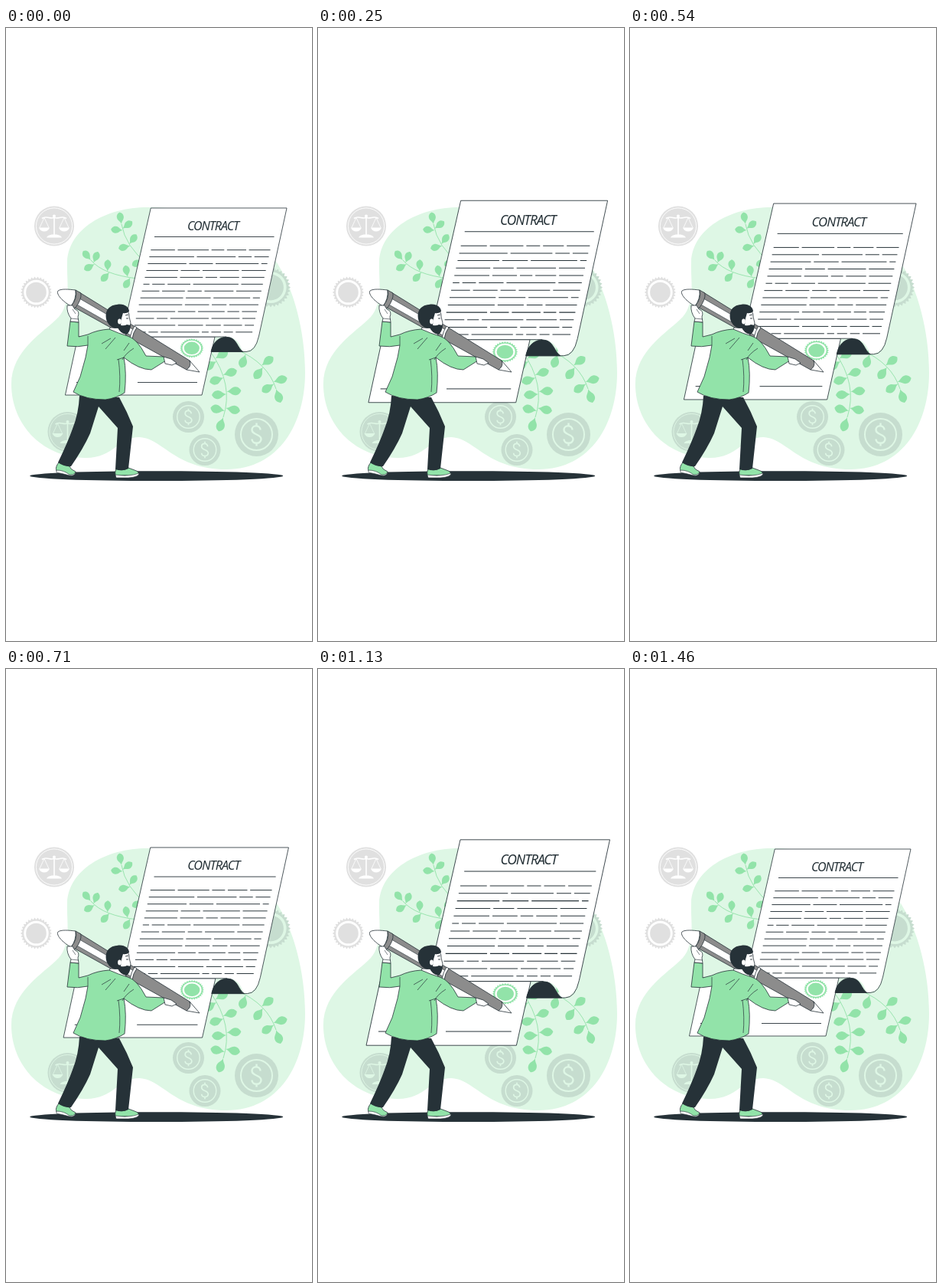
An HTML page with a canvas for the animation above (1.5 s loop, 400 by 800 pixels).

```html
<!DOCTYPE html>
<html lang="en">
<head>
<meta charset="utf-8">
<title>Signing a contract</title>
<style>
html, body { margin: 0; width: 100%; height: 100%; overflow: hidden; background: #fff; }
canvas { display: block; width: 400px; height: 800px; }
</style>
</head>
<body>
<canvas id="stage"></canvas>
<script>
const LOOP = 1500;
const INK = '#263238', GREEN = '#92e3a9', MINT = '#def7e5', WHITE = '#fff';
const GREY = '#e0e0e0', SAGE = '#c6ddcf', BARREL = '#8c8c8c';

const canvas = document.getElementById('stage');
const ratio = window.devicePixelRatio || 1;
canvas.width = 400 * ratio;
canvas.height = 800 * ratio;
const ctx = canvas.getContext('2d');

const mix = (a, b, t) => a + (b - a) * t;

function seeded(seed) {
  return () => {
    const v = Math.sin(seed++ * 12.9898) * 43758.5453;
    return v - Math.floor(v);
  };
}

function shape(d, fill, stroke, width = 0.8) {
  const path = new Path2D(d);
  if (fill) { ctx.fillStyle = fill; ctx.fill(path); }
  if (stroke) { ctx.strokeStyle = stroke; ctx.lineWidth = width; ctx.stroke(path); }
}

function disc(x, y, rx, fill, ry = rx) {
  ctx.fillStyle = fill;
  ctx.beginPath();
  ctx.ellipse(x, y, rx, ry, 0, 0, 7);
  ctx.fill();
}

function ring(x, y, r, color, width) {
  ctx.strokeStyle = color;
  ctx.lineWidth = width;
  ctx.beginPath();
  ctx.arc(x, y, r, 0, 7);
  ctx.stroke();
}

// Draws in local coordinates, then restores the previous space.
function at(x, y, draw, angle = 0, sx = 1, sy = sx) {
  ctx.save();
  ctx.translate(x, y);
  ctx.rotate(angle);
  ctx.scale(sx, sy);
  draw();
  ctx.restore();
}

function badge(x, y, r, color, gap, teeth, sy = 1) {
  at(x, y, () => {
    ctx.fillStyle = color;
    ctx.beginPath();
    for (let i = 0; i < teeth * 2; i++) {
      const a = i * Math.PI / teeth, d = i % 2 ? r * 0.88 : r;
      ctx.lineTo(d * Math.cos(a), d * Math.sin(a));
    }
    ctx.fill();
    disc(0, 0, r * 0.79, gap);
    disc(0, 0, r * 0.65, color);
  }, 0, 1, sy);
}

function scales(x, y, color, line) {
  disc(x, y, 26, color);
  ring(x, y, 23.6, line, 0.9);
  at(x, y, () => {
    shape('M0-13V12M-16-10C-10-14-6-9 0-11C6-9 10-14 16-10', null, line, 1.6);
    for (const side of [-1, 1])
      at(side * 13, 0, () => {
        shape('M0-11L-6 2M0-11L6 2', null, line);
        shape('M-7 2H7Q5 7 0 7Q-5 7-7 2Z', line);
      });
    shape('M-10 15Q-9 12-3 11H3Q9 12 10 15Z', line);
    disc(0, -13, 2, line);
  });
}

function coin(x, y, r) {
  disc(x, y, r, SAGE);
  ring(x, y, r * 0.72, MINT, r * 0.07);
  at(x, y, () => shape('M5-6C5-13-6-13-6-6C-6 1 6-1 6 6C6 13-6 13-6 6M0-15V-11M0 11V15', null, MINT, 2.4), 0, r / 28.5);
}

// Pairs of leaves along a quadratic stem from (x0,y0) to (x1,y1), with one at the tip.
function branch(x0, y0, cx, cy, x1, y1, pairs, size, spread) {
  shape(`M${x0} ${y0}Q${cx} ${cy} ${x1} ${y1}`, null, GREEN, 0.9);
  const along = (a, c, b, t) => mix(mix(a, c, t), mix(c, b, t), t);
  const leaf = (t, turn) => {
    const dx = mix(cx - x0, x1 - cx, t), dy = mix(cy - y0, y1 - cy, t);
    at(along(x0, cx, x1, t), along(y0, cy, y1, t),
      () => shape('M0 0C6-1 7-6 13-6C18-6 20-2 21 0C20 2 18 6 13 6C7 6 6 1 0 0Z', GREEN),
      Math.atan2(dy, dx) + turn, size);
  };
  for (let i = 0; i < pairs; i++) {
    const t = 0.15 + 0.75 * i / (pairs - 1);
    leaf(t, spread);
    leaf(t - 0.04, -spread);
  }
  leaf(1, 0);
}

function backdrop() {
  shape('M185 234C130 234 82 262 80 305C79 330 86 357 69 377C50 397 7 420 7 465C7 515 45 560 103 561C140 562 147 534 174 534C205 535 220 576 288 576C358 576 391 515 391 450C391 400 378 340 350 300C320 256 255 234 185 234Z', MINT);
  scales(63, 258.5, GREY, WHITE);
  scales(80.5, 527, SAGE, MINT);
  badge(39.5, 345, 20.5, GREY, WHITE, 30);
  badge(346, 338.5, 26, SAGE, MINT, 32);
  coin(238.5, 507.5, 20.5);
  coin(260, 550.5, 20.5);
  coin(327.5, 530.5, 28.5);
  branch(185, 308, 156, 285, 151, 256, 3, 0.75, 1.2);
  branch(172, 327, 127, 322, 111, 303, 3, 0.75, 1.2);
  branch(267, 422, 298, 465, 284, 508, 4, 0.92, 1.55);
  branch(302, 420, 342, 437, 353, 471, 3, 0.9, 1.4);
}

function textRows() {
  const random = seeded(5);
  for (let i = 0; i < 13; i++) {
    const y = 289.7 + 8.93 * i, end = 345.5 - 1.95 * i;
    let x = 189.3 - 1.95 * i, d = '';
    while (x < end - 6) {
      let stop = x + 8 + 52 * random();
      if (stop > end - 10) stop = end;
      d += `M${x} ${y}H${stop}`;
      x = stop + 3.6;
    }
    shape(d, null, INK, 0.95);
  }
}

function paper() {
  shape('M94 403H273L256 479H77.5Z', WHITE, INK);
  shape('M189.3 235H367L330.5 402Q326 422.5 309 422.5Q304 403 288 403H151Z', WHITE);
  shape('M268 422.5C271 408 280 403.3 288.5 403.3C302 403.5 302 418 310 422.5Z', INK, INK);
  shape('M288 403H151L189.3 235H367L330.5 402Q326 422.5 314 422.5H268', null, INK);

  ctx.fillStyle = INK;
  ctx.font = "italic 500 16px 'Noto Sans', 'Open Sans', sans-serif";
  ctx.letterSpacing = '-1px';
  ctx.textAlign = 'center';
  ctx.fillText('CONTRACT', 270.5, 264);
  shape('M194 272.5H350.5', null, INK, 0.9);
  textRows();
  shape('M92 462.5H150M172 462.5H250', null, INK, 0.9);
  badge(242.8, 417.8, 15.5, GREEN, WHITE, 28, 0.82);
}

function pen() {
  shape('M96 345L240 434Q244 441 236 446L90 365Z', BARREL, INK);
  shape('M96 353L167 394L163 401L91 360Z', WHITE, INK, 0.6);
  shape('M240 434L253 449L236 446Q243 441 240 434Z', WHITE, INK);
  shape('M168 389Q164 395 162 404L165 406Q166 397 171 391Z', WHITE, INK);
  shape('M91 342C82 341 72 340 68 343C65 347 74 357 85 363Q92 354 91 342Z', WHITE, INK);
  shape('M91 342Q94 352 85 363L90 366Q99 355 98 346Z', BARREL, INK);
}

function shoes() {
  shape('M69 567Q64 573 66 578Q76 579 84 584Q91 584 91 579Q84 576 83 572Z', GREEN, INK);
  shape('M66 577Q76 577 83 583Q88 584 91 580Q90 585 83 584Q76 582 66 580Z', WHITE, INK, 0.6);
  shape('M144 575Q142 580 143 584H173Q175 579 168 577L160 574Q152 579 144 575Z', GREEN, INK);
  shape('M143 583Q160 586 174 581Q174 586 160 587H144Z', WHITE, INK, 0.6);
}

function man() {
  shoes();
  shape('M96 480Q95 503 87 523Q81 540 68 567Q76 573 85 572Q101 549 110 529L121 494L146 522L143 576Q152 579 160 575L166 520Q158 500 148 482Z', INK);
  shape('M136 391L133 400L156 402L160 392Z', WHITE, INK);
  shape('M84 383L80 415Q94 417 107 414L104 430L97 455L88 475Q104 485 130 485Q144 483 155 476Q158 450 154 430Q174 446 190 446L209 434L206 429L183 428Q171 405 159 402Q148 399 135 393Q119 394 107 400L95 403V384Z', GREEN, INK);
  shape('M107 402V414M147 432Q150 455 148 475M152 433Q156 425 167 418M137 405L125 412M143 404L130 419M161 411L154 421M145 433L154 430', null, INK, 0.7);
  shape('M80 362Q79 371 85 379L84 383L95 384L94 377Q97 369 90 367L87 362Z', WHITE, INK);
  shape('M85 379L95 380M87 367L91 373', null, INK, 0.6);
  shape('M206 429L216 432L223 437L217 440L208 438Z', WHITE, INK);
  shape('M153 366Q162 369 161 377L163 385Q162 394 157 395L145 391V373Z', WHITE, INK);
  shape('M132 383C128 371 133 362 145 361C154 359 161 364 161 370Q157 373 153 372L151 379L150 388Q155 389 158 387L163 388Q162 398 157 400Q149 398 146 391Q138 394 132 383Z', INK);
  disc(148.5, 383, 2.4, WHITE, 3.4);
  shape('M156 375L160 374M157 379H160', null, INK, 0.9);
}

// [ms, beat]: whole even beats are rest, odd beats full size; the pulse slows midway.
const tempo = [[0, 0], [380, 1.21], [710, 1.83], [960, 2.48], [1460, 4], [LOOP, 4]];

function pulse(t) {
  const i = tempo.findIndex(([time]) => time > t);
  const [t0, b0] = tempo[i - 1], [t1, b1] = tempo[i];
  const phase = mix(b0, b1, (t - t0) / (t1 - t0)) % 2;
  return 1 + 0.1 * (1 - Math.abs(1 - phase));
}

function render(now) {
  ctx.setTransform(ratio, 0, 0, ratio, 0, 0);
  ctx.fillStyle = WHITE;
  ctx.fillRect(0, 0, 400, 800);
  ctx.lineJoin = 'round';
  backdrop();
  at(222.2, 357, () => {
    ctx.translate(-222.2, -357);
    paper();
  }, 0, pulse(now % LOOP));
  disc(196.7, 584.6, 165.5, INK, 6.4);
  pen();
  man();
  requestAnimationFrame(render);
}
render(performance.now());
</script>
</body>
</html>
```
